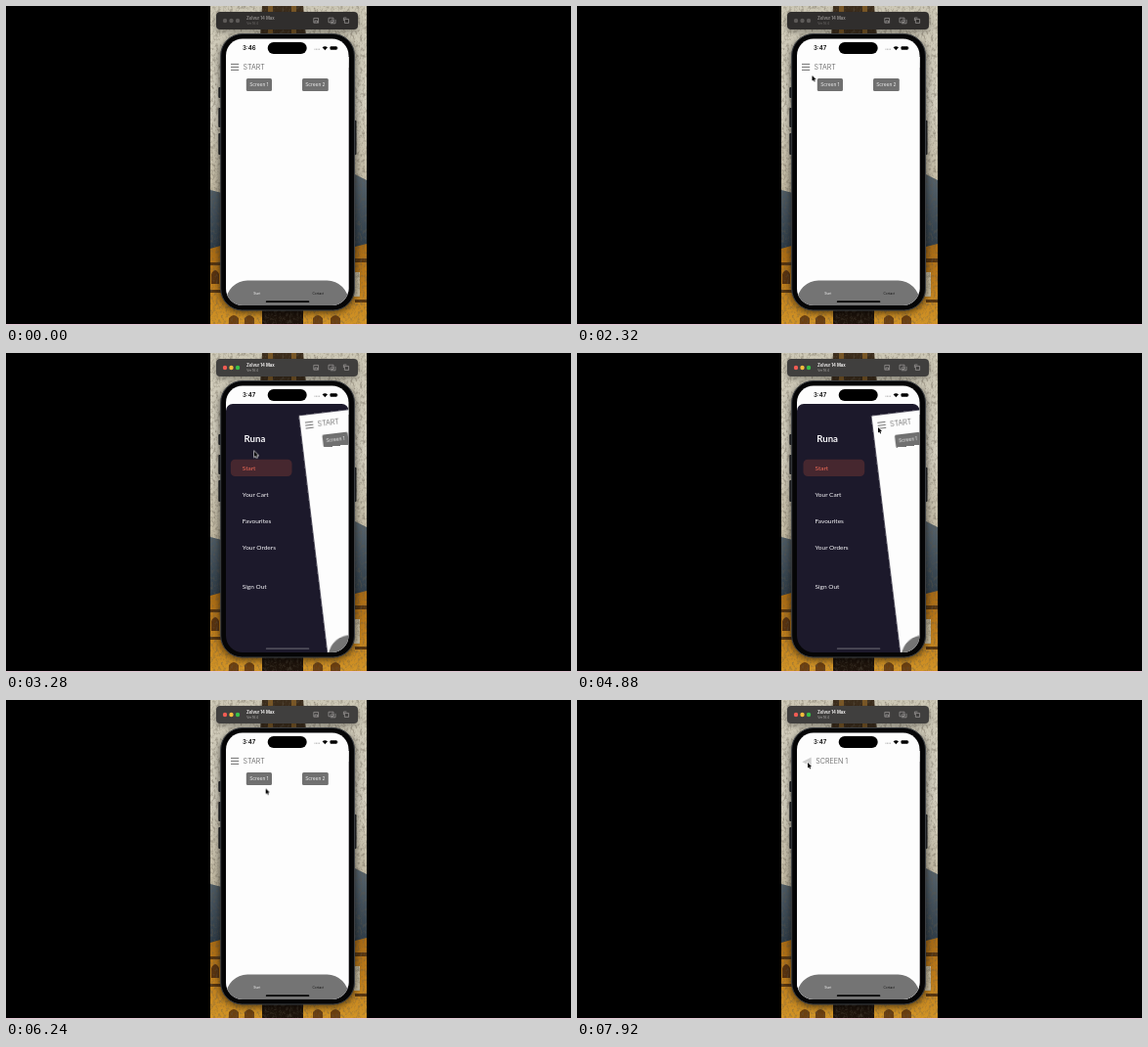
Animation of 578 by 326 pixels, one loop 8000 ms. Source, as an HTML page:

```html
<!DOCTYPE html>
<html lang="en">
<head>
<meta charset="utf-8">
<title>Drawer navigation demo</title>
<style>
  html, body { margin: 0; height: 100%; overflow: hidden; background: #000; }
  svg { display: block; width: 100vw; height: 100vh; }
  text { font-family: Inter, Roboto, sans-serif; }

  .anim { animation: 8s linear infinite; }

  /* window chrome */
  .bar { fill: #302e2d; animation-name: bar; }
  .off { animation-name: hideOnFocus; }
  .on { animation-name: showOnFocus; }
  @keyframes bar { 0%, 35.99% { fill: #302e2d } 36%, 100% { fill: #403f3e } }
  @keyframes hideOnFocus { 0%, 35.99% { opacity: 1 } 36%, 100% { opacity: 0 } }
  @keyframes showOnFocus { 0%, 35.99% { opacity: 0 } 36%, 100% { opacity: 1 } }
  .title { font-size: 4.2px; font-weight: 700; }
  .sub { font-size: 3.1px; }

  /* status bar */
  .clock { font-size: 6px; font-weight: 600; }
  .before { animation-name: before; }
  .after { animation-name: after; }
  @keyframes before { 0%, 14.99% { opacity: 1 } 15%, 100% { opacity: 0 } }
  @keyframes after { 0%, 14.99% { opacity: 0 } 15%, 100% { opacity: 1 } }

  /* drawer and stack share one spring-like curve */
  .drawer, .page, .start, .detail { animation-timing-function: cubic-bezier(.2, .35, .28, 1); }
  .drawer { animation-name: drawer; }
  .drawer text { font: 6.5px Lato, "Open Sans", sans-serif; fill: #f8f7fa; }
  .drawer .user { font-size: 9.6px; font-weight: 700; }
  .drawer .active { fill: #ee6a57; }
  @keyframes drawer {
    0%, 37% { transform: translateX(-91.5px) }
    42%, 64.1% { transform: translateX(0px) }
    69.1%, 100% { transform: translateX(-91.5px) }
  }
  .page { transform-origin: 287.5px 179px; animation-name: page; }
  @keyframes page {
    0%, 37% { transform: translate(0px, 0px) rotate(0deg) }
    42%, 64.1% { transform: translate(91.5px, 4px) rotate(-7deg) }
    69.1%, 100% { transform: translate(0px, 0px) rotate(0deg) }
  }
  .home { fill: #080808; animation-name: home; }
  @keyframes home {
    0%, 38.5% { fill: #080808 } 40.5%, 65.5% { fill: #4d4b58 } 67.5%, 100% { fill: #080808 }
  }

  /* stack */
  .heading { font-size: 7.1px; font-weight: 300; fill: #525252; }
  .label { font-size: 4.8px; fill: #f2f2f2; text-anchor: middle; }
  .tab { font-size: 3.1px; text-anchor: middle; }
  .start { animation-name: start; }
  .detail { animation-name: detail; }
  .back { animation-name: back; }
  @keyframes start {
    0%, 83.2% { transform: translateX(0px) }
    88.2%, 100% { transform: translateX(-37.5px) }
  }
  @keyframes detail {
    0%, 83.2% { transform: translateX(125px) }
    88.2%, 100% { transform: translateX(0px) }
  }
  @keyframes back { 0%, 97.6% { opacity: 1 } 98.6%, 100% { opacity: .3 } }

  .cursor { animation-name: cursor; animation-timing-function: ease-in-out; }
  @keyframes cursor {
    0%, 21% { transform: translate(372px, 190px) }
    29%, 30% { transform: translate(240.5px, 71px) }
    33%, 37% { transform: translate(234px, 62px) }
    41%, 53% { transform: translate(254px, 100.5px) }
    60.5%, 64.25% { transform: translate(308px, 76px) }
    68%, 74% { transform: translate(285px, 104.5px) }
    81%, 88% { transform: translate(254px, 82px) }
    95%, 100% { transform: translate(236px, 64px) }
  }
</style>
</head>
<body>
<svg viewBox="0 0 578 326" preserveAspectRatio="none">
  <defs>
    <clipPath id="scene"><rect x="209" width="160" height="325"/></clipPath>
    <clipPath id="display"><rect x="225" y="33.5" width="125.5" height="272.5" rx="17"/></clipPath>
    <clipPath id="app"><rect x="224" y="52" width="128" height="256"/></clipPath>
    <linearGradient id="plaster" x2="0" y2="1">
      <stop stop-color="#cdc8b6"/><stop offset=".5" stop-color="#d2cdbd"/><stop offset="1" stop-color="#bdb49c"/>
    </linearGradient>
    <linearGradient id="slate" x2="0" y2="1">
      <stop stop-color="#56636c"/><stop offset="1" stop-color="#2c3a46"/>
    </linearGradient>
    <linearGradient id="ochre" x2="0" y2="1">
      <stop stop-color="#a86a14"/><stop offset=".5" stop-color="#bd7c1b"/><stop offset="1" stop-color="#d29426"/>
    </linearGradient>
    <filter id="grain" x="0" y="0" width="1" height="1">
      <feTurbulence type="fractalNoise" baseFrequency=".4 .28" numOctaves="3" seed="4"/>
      <feColorMatrix values="0 0 0 0 .12  0 0 0 0 .1  0 0 0 0 .07  2.4 0 0 0 -1.1"/>
    </filter>
    <filter id="soft" x="-.2" y="-.2" width="1.4" height="1.4"><feGaussianBlur stdDeviation="3"/></filter>
  </defs>

  <rect width="578" height="326"/>

  <!-- wallpaper -->
  <g clip-path="url(#scene)">
    <rect x="209" width="160" height="205" fill="url(#plaster)"/>
    <path d="M262 0h42l3 32h-47z" fill="#3b2c1b"/>
    <path d="M268 0h5v32h-5zM292 0h5v32h-5z" fill="#7a5725"/>
    <path d="M209 188l12 3 130-14 6-5 12 6v72H209z" fill="url(#slate)"/>
    <path d="M209 248l14-4 130 3 16-4v82H209z" fill="url(#ochre)"/>
    <path d="M209 262h11v3h-11zM209 290h12v3h-12zM357 258h12v4h-12zM357 300h12v3h-12z" fill="#55340f"/>
    <path d="M210 284v-10q4-8 8 0v10z" fill="#59330f"/>
    <rect x="356" y="272" width="6" height="25" fill="#c8bda0"/>
    <path d="M262 310h42v15h-42z" fill="#1d130b"/>
    <path d="M228 325v-6q5-6 10 0v6zM244 325v-6q5-6 10 0v6zM314 325v-6q5-6 10 0v6zM332 325v-6q5-6 10 0v6z" fill="#6b3f10"/>
    <rect x="209" width="160" height="325" filter="url(#grain)" opacity=".5"/>
    <rect x="218" y="30" width="140" height="284" rx="24" opacity=".5" filter="url(#soft)"/>
    <rect x="215" y="9" width="145" height="17" rx="5" opacity=".35" filter="url(#soft)"/>
  </g>
  <rect y="325" width="578" height="1" fill="#e3c9d5"/>

  <!-- window bar -->
  <rect class="anim bar" x="215" y="6" width="145" height="18" rx="4"/>
  <g class="anim off" fill="#5d5a58">
    <circle cx="224" cy="15" r="2.2"/><circle cx="230.5" cy="15" r="2.2"/><circle cx="237" cy="15" r="2.2"/>
    <text class="title" x="246" y="14.3" fill="#8e8b89">Zelvur 14 Max</text>
    <text class="sub" x="246.3" y="18.7" fill="#716e6c">Ver 16.4</text>
  </g>
  <g class="anim on">
    <circle cx="224" cy="15" r="2.2" fill="#f25c54"/><circle cx="230.5" cy="15" r="2.2" fill="#f5bd3c"/><circle cx="237" cy="15" r="2.2" fill="#38c149"/>
    <text class="title" x="246" y="14.3" fill="#f0efee">Zelvur 14 Max</text>
    <text class="sub" x="246.3" y="18.7" fill="#b1afad">Ver 16.4</text>
  </g>
  <g fill="none" stroke="#a3a09e" stroke-width=".7">
    <path d="M314.8 12.4h4.8v4.8h-4.8zM316 17v-2h2.4v2"/>
    <path d="M330 12.2h5v4.6h-5zM332 17.8h5v-4"/><circle cx="333.6" cy="15.3" r="1.2"/>
    <path d="M346.4 13.4h4.2v4h-4.2zM345.4 15v-3h3"/>
  </g>

  <!-- phone -->
  <g fill="#1b1c1e">
    <rect x="217.3" y="83" width="3" height="11" rx="1"/><rect x="217.3" y="104" width="3" height="20" rx="1"/>
    <rect x="217.3" y="130" width="3" height="22" rx="1"/><rect x="355.5" y="117" width="3" height="35" rx="1"/>
  </g>
  <rect x="219.7" y="28.5" width="136.8" height="282.5" rx="22" fill="#050506" stroke="#3b3e42" stroke-width="1"/>

  <g clip-path="url(#display)">
    <rect x="224" y="33" width="128" height="30" fill="#fdfdfd"/>
    <g clip-path="url(#app)">
      <rect x="225" y="52" width="125.5" height="270" rx="7" fill="#1c192b"/>
      <g class="anim drawer">
        <text class="user" x="245.3" y="91.2">Runa</text>
        <rect x="231.5" y="108.7" width="62.7" height="17.3" rx="4.5" fill="#46272f"/>
        <text class="active" x="243.5" y="119.6">Start</text>
        <text x="243.5" y="146.7">Your Cart</text>
        <text x="243.5" y="173.8">Favourites</text>
        <text x="243.5" y="200.9">Your Orders</text>
        <text x="243.5" y="241.2">Sign Out</text>
      </g>
      <g class="anim page">
        <rect x="224.8" y="51.8" width="126" height="256" fill="#fdfdfd"/>
        <g class="anim start">
          <path d="M230 59.4h8.2M230 62.4h8.2M230 65.4h8.2" stroke="#5f5f5f" stroke-width=".9"/>
          <text class="heading" x="242.6" y="65">START</text>
          <rect x="245.8" y="74" width="26.2" height="13" rx="1.5" fill="#707070"/>
          <rect x="303" y="74" width="26.8" height="13" rx="1.5" fill="#707070"/>
          <text class="label" x="258.9" y="82.2">Screen 1</text>
          <text class="label" x="316.4" y="82.2">Screen 2</text>
        </g>
        <g class="anim detail">
          <rect x="225" y="52" width="126" height="255" fill="#fdfdfd"/>
          <path class="anim back" d="M230.3 63.2L239.7 58.4V68z" fill="#686868"/>
          <text class="heading" x="244.3" y="65">SCREEN 1</text>
        </g>
        <path d="M225 307V302.5a22 22 0 0 1 22-22H328.5a22 22 0 0 1 22 22V307z" fill="#747474"/>
        <text class="tab" x="256.8" y="295" fill="#f0f0f0">Start</text>
        <text class="tab" x="319.3" y="295" fill="#151515">Contact</text>
      </g>
    </g>

    <!-- status bar -->
    <rect x="267.7" y="37" width="40" height="12" rx="6"/>
    <text class="clock anim before" x="242" y="45.2">3:46</text>
    <text class="clock anim after" x="242" y="45.2">3:47</text>
    <path d="M315.5 44.2h5.6" stroke="#999" stroke-width=".9" stroke-dasharray=".9 .65"/>
    <path d="M326.3 45.2l-2.7-2.9q2.7-2.3 5.4 0z"/>
    <rect x="331.5" y="41.2" width="7.3" height="3.6" rx="1"/><rect x="339.1" y="42.3" width=".6" height="1.4" fill="#777"/>
    <rect class="anim home" x="265.8" y="301.3" width="44.5" height="1.7" rx=".85"/>
  </g>

  <g clip-path="url(#scene)">
    <path class="anim cursor" d="M0 0V5.6L1.3 4.5L2.2 6.5L3.1 6.1L2.3 4.2L4 4.1z" stroke="#fff" stroke-width="1.1" paint-order="stroke"/>
  </g>
</svg>
</body>
</html>
```
